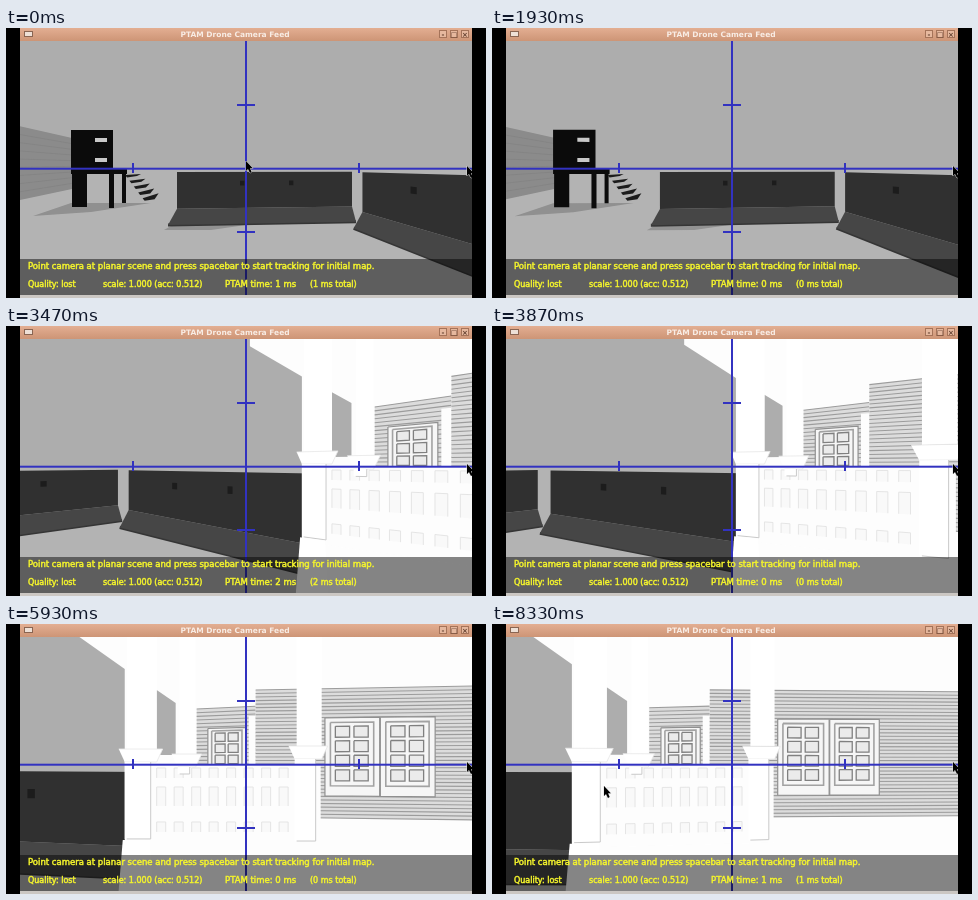
These frames come from a looping animation (480x270 px, 8.39 s). An HTML page with a canvas:

```html
<!DOCTYPE html>
<html lang="en">
<head>
<meta charset="utf-8">
<style>
html, body { margin: 0; width: 100%; height: 100%; overflow: hidden; background: #000; }
canvas { display: block; width: 480px; height: 270px; }
</style>
</head>
<body>
<canvas id="stage" width="480" height="270"></canvas>
<script>
const cx = document.getElementById('stage').getContext('2d');
const LOOP = 8390, STEP = 66.6, FOCAL = 300, NEAR = 60, HORIZON = 140;
// Camera headings at which the three parts of the scene are laid out
const YARD = 0, BEND = .745, PORCH = 1.3135;
let yaw = 0, ref = 0;

const mix = (a, b, k) => a + (b - a) * k;
const progress = (t, a, b) => Math.min(1, Math.max(0, (t - a) / (b - a)));
const ease = (t, a, b) => 1 - (1 - progress(t, a, b)) ** 1.17;

// A slight drift, a fast turn, then a slow settling turn
const heading = t => .009 * progress(t, 0, 1930)
  + 1.19 * ease(t, 1930, 4670) + .2185 * ease(t, 4670, 7400);

// Turn a view ray from the layout heading to the current one
function ray([x, y]) {
  const c = Math.cos(yaw - ref), s = Math.sin(yaw - ref), X = x - 240;
  return [X * c - FOCAL * s, y - HORIZON, X * s + FOCAL * c];
}

// Project an outline, clipped against the near plane
function trace(pts) {
  const rays = pts.map(ray), out = [];
  rays.forEach((b, i) => {
    const a = rays[(i || rays.length) - 1];
    if ((a[2] > NEAR) !== (b[2] > NEAR)) {
      const k = (NEAR - a[2]) / (b[2] - a[2]);
      out.push(a.map((v, j) => mix(v, b[j], k)));
    }
    if (b[2] > NEAR) out.push(b);
  });
  cx.beginPath();
  for (const [x, y, z] of out) cx.lineTo(240 + FOCAL * x / z, HORIZON + FOCAL * y / z);
}

function poly(fill, ...pts) {
  trace(pts);
  cx.closePath();
  cx.fillStyle = fill;
  cx.fill();
}

function line(color, width, ...pts) {
  trace(pts);
  cx.strokeStyle = color;
  cx.lineWidth = width;
  cx.stroke();
}

const corners = (l, t, r, b) => [[l, t], [r, t], [r, b], [l, b]];
const box = (fill, ...edges) => poly(fill, ...corners(...edges));
const frame = (color, width, pts) => line(color, width, ...pts, pts[0]);

function rect(fill, l, t, r, b) {
  cx.fillStyle = fill;
  cx.fillRect(l, t, r - l, b - t);
}

// Sub-rectangle of a quad, in 0..1 coordinates
function part(q, ...edges) {
  return corners(...edges).map(([u, v]) => [0, 1].map(i =>
    mix(mix(q[0][i], q[1][i], u), mix(q[3][i], q[2][i], u), v)));
}

// Upright panel seen in perspective: a and b are its sides as [x, scale]
const panel = (a, b, top, bottom) => [[a, top], [b, top], [b, bottom], [a, bottom]]
  .map(([[x, k], h]) => [x, HORIZON + h * k]);

function barrier(a, b, bolt) {
  const face = panel(a, b, 3.8, 40), foot = panel(a, b, 40, 56);
  foot[2][0] += 4;
  foot[3][0] -= 9;
  line('#353535', 3, foot[3], foot[2]);
  poly('#464646', ...foot);
  poly('#303030', ...face);
  for (const u of [bolt, bolt + .28]) poly('#1c1c1c', ...part(face, u, .25, u + .025, .38));
}

function wall(a, b, top, bottom, rows) {
  const q = panel(a, b, top, bottom);
  poly('#dcdcdc', ...q);
  for (let i = 0; i <= rows; i++)
    line('#9c9c9c', 1.1, ...part(q, 0, i / rows, 1, 1).slice(0, 2));
  return q;
}

function glazing(q, rows) {
  poly('#f6f6f6', ...q);
  frame('#909090', 1.2, q);
  frame('#a2a2a2', 1.6, part(q, .1, .06, .89, .87));
  for (let i = 0; i < rows * 2; i++) {
    const u = .19 + i % 2 * .34, v = .11 + (i >> 1) * .74 / rows;
    const pane = part(q, u, v, u + .26, v + .56 / rows);
    poly('#ebebeb', ...pane);
    frame('#808080', 1.3, pane);
  }
}

function column(x, width, cap, foot) {
  const neck = cap + 13, r = x + width, side = r - 6;
  const capital = [[x - 8, cap], [r + 6, cap], [r, neck], [x - 2, neck]];
  box('#fff', x, -300, r, cap);
  poly('#fff', ...capital);
  line('#e8e8e8', .8, ...capital);
  box('#fff', x - 2, neck, side, foot);
  line('#cacaca', 1, [side, neck], [side, foot], [x, foot]);
}

function shelf(x) {
  const black = '#0b0b0b';
  poly('#909090', [x - 38, 188], [x, 175], [x + 80, 175], [x + 20, 184]);
  box(black, x, 102, x + 42, HORIZON);
  box(black, x, HORIZON, x + 56, 146);
  for (const [left, width, foot] of [[1, 15, 179], [38, 5, 180], [51, 4, 175]])
    box(black, x + left, HORIZON, x + left + width, foot);
  for (const y of [110, 130]) box('#c8c8c8', x + 24, y, x + 36, y + 4);
  for (let i = 0; i < 5; i++) {
    const l = x + 54 + i * 4.4, y = 147 + i * 5.8;
    poly('#1c1c1c', [l, y], [l + 16, y - 1 - i], [l + 12, y + 1], [l + 2, y + 2.5]);
  }
}

function yard() {
  ref = YARD;
  const side = [[-10, 93], [66, 110], [66, 161], [-10, 177]];
  poly('#8b8b8b', ...side);
  for (let i = 1; i < 9; i++) line('#838383', .8, ...part(side, 0, i / 9, 1, 1).slice(0, 2));
  shelf(65);
  poly('#929292', [158, 202], [172, 194], [240, 197], [205, 202]);
  barrier([171, 1.02], [346, .96], .36);
}

function fence(l, r, count) {
  box('#fdfdfd', l, HORIZON, r, 220);
  for (let i = 0; i < count * 3; i++) {
    const x = l + 11 + i % count * 17.5, row = Math.floor(i / count);
    const y = 144 + row * 27 - row % 2 * 8, b = y + 10 + row % 2 * 9;
    box('#f9f9f9', x, y, x + 9, b);
    line('#e2e2e2', .9, [x, b], [x, y], [x + 9, y], [x + 9, b]);
  }
}

function porch() {
  ref = PORCH;
  poly('#fdfdfd', [53, -300], [540, -300], [540, 340], [118, 340], [118, 45], [53, -1]);
  poly('#adadad', [150, 66], [169, 79], [169, 131], [150, 131]);
  const back = wall([190, 1], [249, 1.05], -55, 0, 15);
  glazing(part(back, .19, .36, .84, 1.16), 3);
  box('#fdfdfd', 242, 92, 249, HORIZON);
  const front = wall([249, 1], [540, 1.07], -74, 53, 36);
  for (const u of [.238, .428]) glazing(part(front, u, .225, u + .188, .83), 4);
  fence(139, 314, 8);
  column(173, 16, 130, 150);
  column(290, 25, 122, 217);
  column(120, 30, 125, 215);
  poly('#fff', [116, 216], [143, 216], [150, 340], [106, 340]);
}

function scene() {
  rect('#adadad', 14, 13, 466, 141);
  rect('#b3b3b3', 14, 141, 466, 267);
  yard();
  ref = BEND;
  barrier([122, 1.1], [320, 2.05], .22);
  porch();
}

function crosshair() {
  const blue = '#3232c0';
  rect(blue, 239, 13, 241, 267);
  rect(blue, 14, 139.7, 466, 141.7);
  for (const x of [127, 353]) rect(blue, x - 1, 135, x + 1, 145);
  for (const y of [77, 204]) rect(blue, 231, y - 1, 249, y + 1);
}

function text(str, x, y, font, color, outline = 0) {
  cx.font = font + ' "DejaVu Sans", sans-serif';
  cx.fillStyle = cx.strokeStyle = color;
  cx.lineWidth = outline;
  cx.fillText(str, x, y);
  if (outline) cx.strokeText(str, x, y);
}

function status(ms) {
  rect('rgba(0,0,0,.48)', 14, 231, 466, 267);
  const put = (str, x, y, size) => text(str, x, y, size + 'px', '#f4f42c', .5);
  put('Point camera at planar scene and press spacebar to start tracking for initial map.', 22, 241, 8.5);
  put('Quality: lost', 22, 258.5, 8);
  put('scale: 1.000 (acc: 0.512)', 97, 258.5, 8);
  put(`PTAM time: ${ms} ms`, 219, 258.5, 8.5);
  put(`(${ms} ms total)`, 304, 258.5, 8);
}

function chrome() {
  const bar = cx.createLinearGradient(0, 0, 0, 13);
  bar.addColorStop(0, '#e3ae92');
  bar.addColorStop(1, '#cd9576');
  rect(bar, 14, 0, 466, 13);
  rect('#cbc7c3', 14, 267, 466, 270);
  rect('#8a6552', 18, 3, 27, 9);
  rect('#eee0d6', 19, 4, 26, 8);
  cx.textAlign = 'center';
  text('PTAM Drone Camera Feed', 229, 8.5, 'bold 7.5px', '#f8ece4');
  [...'-□×'].forEach((sign, i) => {
    const x = 437 + i * 11;
    rect('#a57359', x - 4, 2, x + 4, 10);
    rect('#e6b89e', x - 3, 3, x + 3, 9);
    text(sign, x, 8.5, 'bold 7px', '#5f3c2c');
  });
  cx.textAlign = 'left';
}

function pointer(x, y) {
  const arrow = new Path2D('M0 0V10L2 8L4 12L5.6 11L4 7.3H6.8Z');
  cx.save();
  cx.translate(x, y);
  cx.strokeStyle = '#ddd';
  cx.lineWidth = 1;
  cx.stroke(arrow);
  cx.fillStyle = '#000';
  cx.fill(arrow);
  cx.restore();
}

function draw(now) {
  const n = Math.min(125, Math.floor((now % LOOP + 10) / STEP));
  yaw = heading(n * STEP);
  rect('#000', 0, 0, 480, 270);
  cx.save();
  cx.beginPath();
  cx.rect(14, 0, 452, 270);
  cx.clip();
  scene();
  crosshair();
  status(n && n % 13 === 0 ? 2 : n % 25 % 6 ? 0 : 1);
  chrome();
  pointer(461, 138);
  if (n < 2) pointer(240, 133);
  if (n > 123) pointer(112, 162);
  cx.restore();
}

const start = performance.now();
function tick() {
  draw(performance.now() - start);
  requestAnimationFrame(tick);
}
tick();
</script>
</body>
</html>
```
